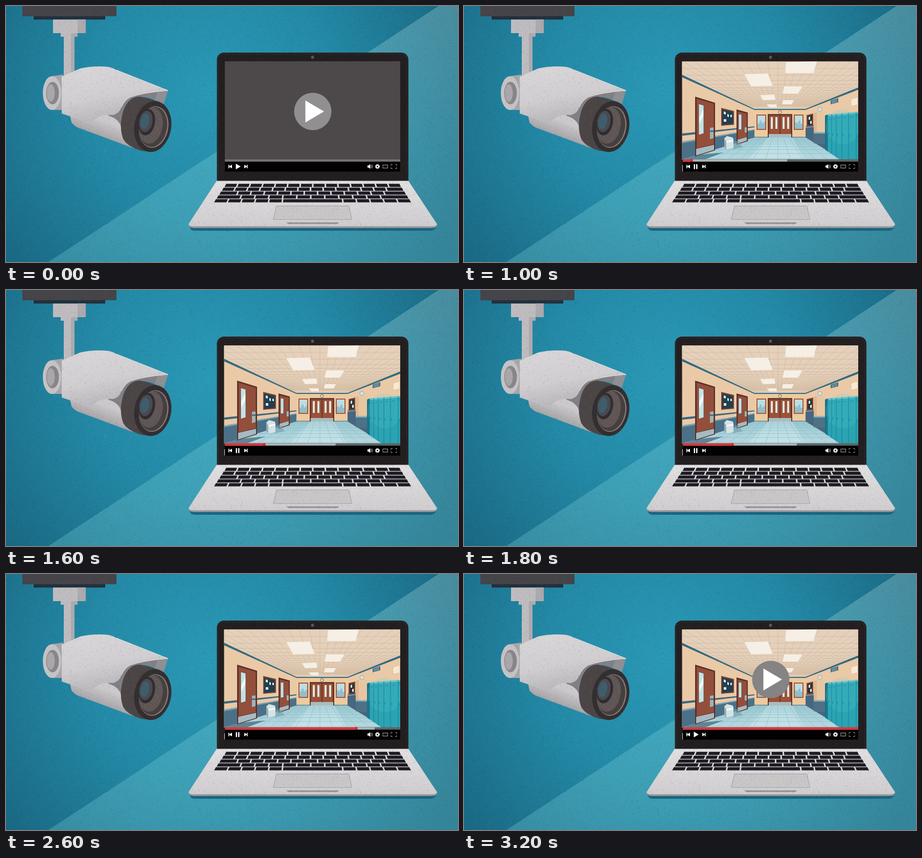
Write an HTML page with a canvas that moves like this. It is 884 px wide and 500 px high and loops after 8 s.

```html
<!DOCTYPE html>
<html lang="en">
<head>
<meta charset="utf-8">
<title>Camera and laptop</title>
<style>
html, body { margin: 0; width: 100%; height: 100%; overflow: hidden; background: #23849f; }
svg, canvas { position: absolute; left: 0; top: 0; width: 884px; height: 500px; display: block; }
canvas { pointer-events: none; }
</style>
</head>
<body>
<svg viewBox="0 0 884 500">
  <defs>
    <radialGradient id="sky" gradientUnits="userSpaceOnUse" cx="400" cy="170" r="540">
      <stop offset="0" stop-color="#2a99b6"/><stop offset=".45" stop-color="#2389a6"/>
      <stop offset="1" stop-color="#196580"/>
    </radialGradient>
    <linearGradient id="beam" x1="0" y1="0" x2="0" y2="1">
      <stop offset="0" stop-color="#c0e6e2" stop-opacity=".28"/>
      <stop offset=".6" stop-color="#8fe0e2" stop-opacity=".26"/>
      <stop offset="1" stop-color="#80dce0" stop-opacity=".27"/>
    </linearGradient>
    <linearGradient id="shell" x1="0" y1="0" x2=".35" y2="1">
      <stop offset="0" stop-color="#d9d7d9"/><stop offset=".6" stop-color="#d0ced1"/>
      <stop offset="1" stop-color="#bab7bb"/>
    </linearGradient>
    <linearGradient id="barrel" gradientUnits="userSpaceOnUse" x1="194" y1="215" x2="178" y2="258">
      <stop offset=".2" stop-color="#cbc9cb"/><stop offset="1" stop-color="#a19ea1"/>
    </linearGradient>
    <linearGradient id="deck" x1="0" y1="0" x2="0" y2="1">
      <stop offset="0" stop-color="#e1dfe0"/><stop offset="1" stop-color="#cfcdcf"/>
    </linearGradient>
    <linearGradient id="floor" x1="0" y1="0" x2="0" y2="1">
      <stop offset="0" stop-color="#9ccad3"/><stop offset="1" stop-color="#b6d9e0"/>
    </linearGradient>
    <clipPath id="view"><rect x="426.500" y="108.500" width="344.500" height="191.500"/></clipPath>
    <clipPath id="roof"><path d="M426 108H771V160L668 201H568L426 135Z"/></clipPath>
    <clipPath id="ground"><path d="M568 257H668L740 300H426Z"/></clipPath>
    <clipPath id="cabinet"><path d="M711 212L771 207V300H735L711 284Z"/></clipPath>
  </defs>

  <rect width="884" height="500" fill="url(#sky)"/>
  <path d="M846 0H884V500H83Z" fill="url(#beam)"/>

  <g id="camera">
    <path d="M32 0H216V20H32Z" fill="#454449"/>
    <path d="M54 20H194V26.500H54Z" fill="#22303c"/>
    <path d="M92 26.500H156V53H140V60H134V138H113V60H107V53H92Z" fill="#bfbcc0"/>
    <path d="M140 26.500H156V53H140V60H134V138H127V53H140Z" fill="#adaaae"/>
    <path d="M90 137L112 134V203H90Z" fill="#a9a6aa"/>
    <ellipse cx="90" cy="170" rx="18" ry="33" fill="#c5c3c6"/>
    <ellipse cx="91" cy="170" rx="12.500" ry="22" fill="#88868a"/>
    <ellipse cx="87.500" cy="170" rx="8" ry="17" fill="#a9a7aa"/>
    <path d="M125 212L128 227Q132 234 142 238L250 278L278 190L200 190Z" fill="url(#barrel)"/>
    <path d="M200 150L317 165L308.500 191Q284 177 262 177L232 217L226 244Q226 222 200 214Z" fill="#828085"/>
    <path d="M296 168L317 165L308.500 191L290 183Z" fill="#8e9095"/>
    <path d="M109 138L145 122Q172 116 201 119Q209 121 216 125L317 165Q268 169 243 178Q232 184 226 197Q221 211 209 213Q190 211 178 219Q167 227 157 226L109 210Z" fill="url(#shell)"/>
    <path d="M216 125L317 165Q268 169 243 178Q232 184 226 197" fill="none" stroke="#e3e1e2"/>
    <path d="M262 177Q240 177 230 203Q220 234 229 259Q237 275 266 283L288 285L311 194Q289 181 262 177Z" fill="#4b4546"/>
    <g transform="rotate(10 287 235.500)">
      <ellipse cx="287" cy="235.500" rx="36" ry="50" fill="#332e30"/>
      <ellipse cx="289" cy="236" rx="28.500" ry="41" fill="#857b79"/>
      <ellipse cx="288" cy="236" rx="27" ry="39.500" fill="#453f40"/>
      <ellipse cx="283" cy="234" rx="23" ry="36" fill="#5f5655"/>
      <ellipse cx="274" cy="229" rx="16" ry="26" fill="#302c30"/>
      <ellipse cx="272" cy="228" rx="13" ry="21" fill="#4a4a50"/>
      <ellipse cx="270" cy="228" rx="8.500" ry="15" fill="#3f5e6d"/>
    </g>
  </g>

  <g id="laptop">
    <path d="M359 430H841Q840 439 830 439H370Q360 439 359 430Z" fill="#1a657f"/>
    <path d="M412.500 342V105A14 14 0 0 1 426.500 91H773A14 14 0 0 1 787 105V342Z" fill="#231f20"/>
    <path d="M415 341V106A12 12 0 0 1 427 93.500H772.500A12 12 0 0 1 784.500 106V341" fill="none" stroke="#302c2d"/>
    <circle cx="599.500" cy="100" r="3" fill="#59575a"/>
    <path d="M357 425H843V428Q841 433.500 832 433.500H368Q359 433.500 357 428Z" fill="#9f9da0"/>
    <path d="M412 341.500H787L843 426Q842 430 834 430H366Q358 430 357 426Z" fill="url(#deck)"/>
    <g id="keys" fill="#1e1c22"/>
    <path d="M529 390.500H670.500L676.500 417H523Z" fill="#c9c6c8" stroke="#a29fa2"/>
    <path d="M548 422.500H652L648 426H552Z" fill="#98969a"/>
  </g>

  <rect x="428" y="108" width="343" height="196" fill="#4d494a"/>
  <g id="hall" clip-path="url(#view)">
    <rect x="426" y="108" width="345" height="192" fill="#eac9a7"/>
    <path d="M426 108H771V160L668 201H568L426 135Z" fill="#e4d0bb"/>
    <g id="tiles" clip-path="url(#roof)" stroke="#cfb598" stroke-width=".7" fill="none"/>
    <path fill="#f6efe5" d="M548 133L594 132L604 156L562 157ZM630 110L690 108L684 131H628ZM626 157H662L653 171H623ZM579 174L607 173L609 183L585 184ZM624 184H645L641 192H622ZM592 192H611L612 198H597Z"/>
    <path d="M568 201H668V257H568Z" fill="#edca9f"/>
    <path d="M426 134L568 201H668L771 159V163.500L668 203H568L426 139Z" fill="#356b80"/>

    <path d="M426 249L568 235V237L426 253.500Z" fill="#3b687e"/>
    <path d="M426 265L568 241V257L426 301Z" fill="#4a7188"/>
    <path d="M426 265L568 241V242.500L426 268Z" fill="#7ba6b3"/>
    <path d="M568 255.500H668V257H568Z" fill="#5f8795"/>
    <path d="M668 234L706 230V280L668 257Z" fill="#47667f"/>
    <path d="M668 234L706 229V234L668 238Z" fill="#7ba6b3"/>

    <path d="M568 257H668L740 300H426Z" fill="url(#floor)"/>
    <path d="M594 257H642L666 300H556Z" fill="#d9eff0" opacity=".42"/>
    <g id="slabs" clip-path="url(#ground)" stroke="#8bbac5" stroke-width=".7" fill="none"/>
    <path d="M427 300L455 291L508 286L470 300Z" fill="#5a8798"/>

    <path d="M452 177L491 189V282L452 294Z" fill="#5e3028"/>
    <path d="M455 181L488.500 191V270L455 278Z" fill="#934f3b"/>
    <path d="M454 279L489 271V281L454 292Z" fill="#a6bac2"/>
    <path d="M459 191L469 194V249L459 252Z" fill="#c4e2e6" stroke="#643528" stroke-width=".7"/>
    <path d="M460 218L468 202V214L460 231Z" fill="#f0faf8"/>
    <path d="M481 238L488 237V258L481 260Z" fill="#9eb4ba"/>
    <path d="M480 243H488V246H480Z" fill="#536f7a"/>
    <path d="M533 202L555 208V264L533 271Z" fill="#5e3028"/>
    <path d="M535.500 206L553 210V256L535.500 260Z" fill="#934f3b"/>
    <path d="M537 211L543 212V241L537 242Z" fill="#c4e2e6" stroke="#643528" stroke-width=".7"/>
    <path d="M549 237H553V247H549Z" fill="#9eb4ba"/>
    <path d="M535 261L553 256V263L535 269Z" fill="#a6bac2"/>
    <path d="M503 199L528 205V232L503 234Z" fill="#7c432f"/>
    <path d="M505 202L526 207V230L505 232Z" fill="#203f50"/>
    <path d="M508 206L512 207V212L508 211ZM515 211L518 212V217L515 216ZM508 221L513 221V226L508 226ZM521 212L524 213V217H521Z" fill="#e4e9e2"/>
    <path d="M527 264H537L545 276L526 280Z" fill="#709daa" opacity=".6"/>
    <path d="M509 259L514 254L526 257L527 262V277L513 280L509 277Z" fill="#d5e3e5"/>
    <path d="M509 259L513 264V280L509 277Z" fill="#94afb8"/>
    <path d="M513 264L527 261V264L513 267Z" fill="#fafaf5"/>

    <path d="M594 211H642V257H594Z" fill="#69382c"/>
    <path d="M597 214H617V250H597ZM619 214H639V250H619Z" fill="#9c5137"/>
    <path d="M600 217H604V240H600ZM609 217H613V240H609ZM623 217H627V240H623ZM632 217H636V240H632Z" fill="#d9e8e1"/>
    <path d="M596 250H640V257H596Z" fill="#a8bcc0"/>
    <path d="M572 212H591V242H572ZM645 212H664V242H645Z" fill="#a65a3d"/>
    <path d="M574 214H589V240H574ZM647 214H662V240H647Z" fill="#bcdde4"/>
    <path d="M574 240V231L578 228V224H582V229H586V226H589V240ZM647 240V227H651V231L655 224H658V230H662V240Z" fill="#92bfcb"/>
    <circle cx="618" cy="207" r="3" fill="#fbf7ea" stroke="#715046"/>
    <path d="M618 205V207H620" fill="none" stroke="#555" stroke-width=".6"/>
    <path d="M670 213L683 210V235L670 236Z" fill="#814731"/>
    <path d="M672 215L681 213V232L672 233Z" fill="#29333c"/>
    <path d="M674 217L677 216V222H674ZM677 225L680 224V230H677Z" fill="#f1eee3"/>

    <path d="M684 209L690 207H706V247H684Z" fill="#e9c6a2"/>
    <path d="M684 209L690 207V247H684Z" fill="#deb892"/>
    <path d="M684 247H706V270L684 268Z" fill="#4f7186"/>
    <path d="M684 246H706V249H684Z" fill="#89b2bb"/>
    <circle cx="696" cy="202" r="4" fill="#dbe2dd" stroke="#94a8ab"/>
    <path d="M717 185L732 180V188L717 192Z" fill="#426e80"/>
    <path d="M719 187L730 183M719 189.500L730 186" stroke="#a4bfc3"/>
    <path d="M757 182L770 178V193L757 196Z" fill="#f7e8d3" stroke="#d7b995" stroke-width=".8"/>

    <path d="M706 214L711 212L771 207V300H735L706 280Z" fill="#2aa3b2"/>
    <path d="M706 214L711 212V284L706 280Z" fill="#187589"/>
    <path d="M711 212L771 207V210L711 215Z" fill="#67c5cc"/>
    <circle cx="741" cy="236" r="34" fill="#65cad0" opacity=".18"/>
    <g id="lockers" clip-path="url(#cabinet)" stroke="#1b8093" fill="none"/>
  </g>

  <rect x="428" y="299.500" width="343" height="4.500" fill="#757273"/>
  <g id="track">
    <rect x="428" y="299.500" width="343" height="4.500" fill="#5c6467"/>
    <rect id="buffer" x="428" y="299.500" height="4.500" fill="#a7b3b6"/>
    <rect id="played" x="428" y="299.500" height="4" fill="#ed2830"/>
    <circle id="knob" cy="301.500" r="2.800" fill="#ed2027"/>
    <rect x="427" y="311" width="1" height="12" fill="#d8d8d8"/>
  </g>
  <rect x="428" y="304" width="343" height="19.500" fill="#020202"/>
  <g fill="#fff">
    <path d="M435 310H436.500V313L442 310V317L436.500 314V317H435Z"/>
    <path d="M466 310L471 313V310H472.500V317H471V314L466 317Z"/>
    <path id="playIcon" d="M449.500 308L459 313.500L449.500 319Z"/>
    <path id="pauseIcon" d="M449.500 309H452V318.500H449.500ZM454 309H456.500V318.500H454Z"/>
    <path d="M707 311.500H709L712.500 309V318L709 315.500H707Z"/>
    <path d="M714 311Q716 313.500 714 316M715.500 309.500Q718.500 313.500 715.500 317.500" fill="none" stroke="#ddd" stroke-width=".8"/>
    <circle cx="726.500" cy="313.500" r="2.600" fill="none" stroke="#fff" stroke-width="2"/>
    <circle cx="726.500" cy="313.500" r="4" fill="none" stroke="#fff" stroke-width="1.400" stroke-dasharray="1.570 1.570"/>
  </g>
  <rect x="737" y="310.500" width="9.500" height="6" fill="none" stroke="#aaa"/>
  <path d="M753 312V309.500H756M761 309.500H764V312M764 315V317.500H761M756 317.500H753V315" fill="none" stroke="#999"/>

  <circle id="disc" cx="600" cy="206" r="36.500"/>
  <path id="bigPlay" d="M585.500 184.500L622 206L585.500 227.500Z" fill="#fff"/>
  <path id="bigPause" d="M588 190H596V222.500H588ZM602.500 190H610.500V222.500H602.500Z" fill="#fff"/>
</svg>
<canvas id="grain" width="884" height="500"></canvas>
<script>
const $ = id => document.getElementById(id);
const add = (id, d) => {
  const path = document.createElementNS("http://www.w3.org/2000/svg", "path");
  path.setAttribute("d", d);
  $(id).append(path);
};
const show = (id, on) => $(id).setAttribute("visibility", on ? "visible" : "hidden");

// Keys narrow towards the lid; widths are relative within each row.
function drawKeys() {
  const even = n => Array(n).fill(1);
  const rows = [
    even(14),
    [...even(13), 1.4],
    [1.4, ...even(11), 1.7],
    [1.8, ...even(10), 2.1],
    [...even(5), 4.85, ...even(5)]
  ];
  rows.forEach((row, r) => {
    const top = 347.3 + r * 7.5, left = 427.5 - r * 5.1, right = 772.5 + r * 4.9;
    const gap = 3, unit = (right - left - gap * (row.length - 1)) / row.reduce((a, b) => a + b);
    const lean = x => x + (600 - x) * 0.018;
    let x = left, d = "";
    for (const w of row) {
      const end = x + w * unit;
      d += `M${lean(x)} ${top}H${lean(end)}L${end} ${top + 6.3}H${x}Z`;
      x = end + gap;
    }
    add("keys", d);
  });
}

function drawHall() {
  const vx = 614, vy = 222;
  let rays = "", rows = "";
  for (let i = -22; i <= 22; i++) rays += `M${vx} ${vy}L${vx + i * 22} 100`;
  for (let i = 0; i < 20; i++) rows += `M426 ${vy - 118 / (1 + i * 0.18)}H771`;
  add("tiles", rays + rows);

  rays = rows = "";
  for (let i = -12; i <= 12; i++) rays += `M${vx} ${vy}L${vx + i * 25} 302`;
  for (let i = 0; i < 9; i++) rows += `M426 ${vy + 76 / (1 + i * 0.15)}H771`;
  add("slabs", rays + rows);

  [711, 719, 728, 739, 752, 767].forEach((x, i) => {
    const slot = 3 + i * 0.6;
    add("lockers", `M${x} ${212 - (x - 711) / 12}V300`);
    add("lockers", `M${x + 3} ${221 - i}h${slot}M${x + 2} ${247 + i}v5`);
  });
}

function drawGrain() {
  const g = $("grain").getContext("2d");
  let seed = 7;
  const rand = () => (seed = (seed * 16807) % 2147483647) / 2147483647;
  for (let i = 0; i < 30000; i++) {
    const x = rand() * 884, y = rand() * 500, size = 0.6 + rand() * 0.8;
    const inView = x > 426 && x < 772 && y > 107 && y < 324;
    g.fillStyle = rand() < 0.6 ? "rgba(0,20,30,.12)" : "rgba(255,255,255,.07)";
    if (!inView) g.fillRect(x, y, size, size);
  }
}

// Linear interpolation through [time, value] pairs.
function along(keys, t) {
  if (t <= keys[0][0]) return keys[0][1];
  for (let i = 1; i < keys.length; i++) {
    const [t0, a] = keys[i - 1], [t1, b] = keys[i];
    if (t <= t1) return a + (b - a) * (t - t0) / (t1 - t0);
  }
  return keys[keys.length - 1][1];
}

// Playback runs at one pace, then doubles until the end.
const LOOP = 8000, START = 500, CLEAR = 1000, END = 3200, STEP = 200;
const headKeys = [[1000, 445], [1800, 525], [3000, 765], [3200, 771]];
const bufferKeys = [[1200, 632], [1800, 651], [2200, 674], [3000, 768], [3200, 771]];

function render(time) {
  const t = time % LOOP, tick = Math.floor(t / STEP) * STEP;
  const idle = t < START, done = t >= END, paused = idle || done;
  const intro = !idle && t < CLEAR;
  const head = along(headKeys, tick);

  show("hall", !idle);
  show("track", !idle);
  show("playIcon", paused);
  show("pauseIcon", !paused);
  show("disc", paused || intro);
  show("bigPlay", paused);
  show("bigPause", intro);
  show("knob", !paused);
  $("disc").setAttribute("fill", idle ? "#918f90" : done ? "#858384" : "#4a4647");
  $("played").setAttribute("width", head - 428);
  $("buffer").setAttribute("width", along(bufferKeys, tick) - 428);
  $("knob").setAttribute("cx", head);
}

function frame() {
  render(performance.now());
  requestAnimationFrame(frame);
}

drawKeys();
drawHall();
drawGrain();
frame();
</script>
</body>
</html>
```
